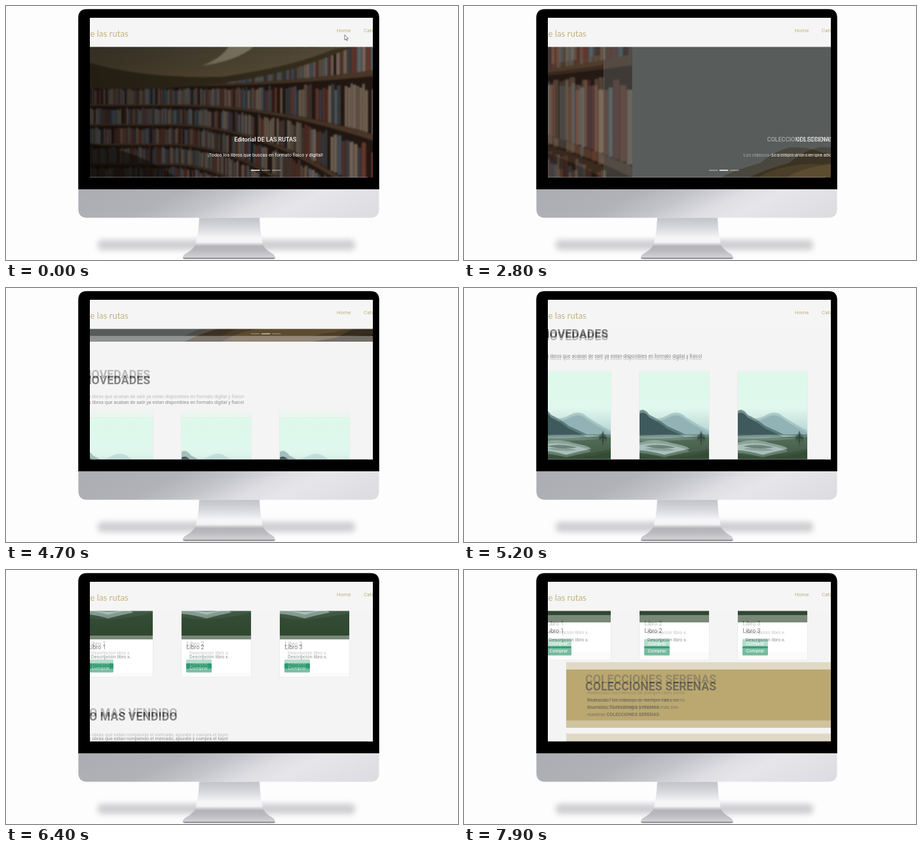
An HTML page that plays this animation: 690 px wide and 388 px high, repeating every 8 s.

```html
<!DOCTYPE html>
<html lang="es">
<head>
<meta charset="utf-8">
<title>Librería en pantalla</title>
<style>
  html, body { margin: 0; width: 100%; height: 100%; overflow: hidden; background: #fdfdfd; }
  svg { display: block; width: 690px; height: 388px; font-family: Roboto, sans-serif; }
  .h2 { font-size: 17.8px; font-weight: 700; fill: #4a4a4a; }
  .p { font-size: 7.17px; fill: #555; }
  .cap { font-size: 9px; font-weight: 500; fill: #fff; text-anchor: middle; }
  .sub { font-size: 7.2px; fill: #fff; text-anchor: middle; }
  .card { font-size: 8.8px; fill: #333; }
  .btn { font-size: 7.2px; fill: #fff; text-anchor: middle; }
  .nav { font-size: 8px; fill: #c0ae78; }
  .logo { font: 13.2px Lato, sans-serif; fill: #c4b27c; }
</style>
</head>
<body>
<svg viewBox="0 0 690 388">
  <defs>
    <clipPath id="view"><rect x="128" y="18" width="432" height="244"/></clipPath>
    <linearGradient id="chin" gradientUnits="userSpaceOnUse" x1="111" y1="279" x2="220" y2="498">
      <stop offset="0" stop-color="#acadb2"/><stop offset=".3" stop-color="#b1b2b7"/>
      <stop offset=".45" stop-color="#c3c4c9"/><stop offset=".6" stop-color="#dedee3"/>
      <stop offset=".7" stop-color="#e6e6ea"/><stop offset="1" stop-color="#dcdce0"/>
    </linearGradient>
    <linearGradient id="neck" x1="0" y1="0" x2="0" y2="1">
      <stop offset="0" stop-color="#c2c3c8"/><stop offset=".25" stop-color="#d8d9dd"/>
      <stop offset=".5" stop-color="#f6f6f8"/><stop offset=".6" stop-color="#f4f4f6"/>
      <stop offset=".7" stop-color="#b4b4b9"/><stop offset=".8" stop-color="#b8b8bd"/>
      <stop offset="1" stop-color="#d6d6da"/>
    </linearGradient>
    <linearGradient id="shade">
      <stop offset="0" stop-color="#000" stop-opacity=".55"/>
      <stop offset=".45" stop-color="#000" stop-opacity=".35"/>
      <stop offset="1" stop-color="#000" stop-opacity=".1"/>
    </linearGradient>
    <linearGradient id="roof" x1="0" y1="0" x2="0" y2="1">
      <stop offset="0" stop-color="#6b5f48"/><stop offset=".55" stop-color="#75674a"/>
      <stop offset="1" stop-color="#8a7648"/>
    </linearGradient>
    <linearGradient id="sky" x1="0" y1="0" x2="0" y2="1">
      <stop offset="0" stop-color="#dcf9ea"/><stop offset=".35" stop-color="#e0f8ee"/>
      <stop offset=".6" stop-color="#b4d2d2"/>
    </linearGradient>
    <linearGradient id="grass" x1="0" y1="0" x2="0" y2="1">
      <stop offset="0" stop-color="#56705c"/><stop offset="1" stop-color="#2f462f"/>
    </linearGradient>
    <filter id="blur" x="-10%" y="-100%" width="120%" height="300%"><feGaussianBlur stdDeviation="4"/></filter>
    <filter id="soft"><feGaussianBlur stdDeviation=".8"/></filter>
  </defs>
  <rect width="690" height="388" fill="#fdfdfd"/>
  <rect x="140" y="357" width="393" height="16" rx="6" fill="#cfcfd2" filter="url(#blur)"/>
  <path d="M110.500 279H569.500V310Q569.500 323.500 556 323.500H124Q110.500 323.500 110.500 310Z" fill="url(#chin)"/>
  <path d="M295 323.500H387Q388.500 350 391.500 362Q394 372 408 379Q412 383 410 385.500H271Q268 383 273 379Q287 372 290 362Q293.500 350 295 323.500Z" fill="url(#neck)"/>
  <path d="M270 384.500Q270 386.500 275 386.500H406Q411 386.500 411 384.500Z" fill="#85858b"/>
  <path d="M110.300 280V18Q110.300 4.800 124 4.800H556Q569.700 4.800 569.700 18V280Z" fill="#000"/>
  <g clip-path="url(#view)">
    <rect x="128" y="18" width="432" height="244" fill="#f4f4f4"/>
    <g id="pages"></g>
    <rect x="128" y="18" width="432" height="44.500" fill="#f5f5f5"/>
    <text class="logo" x="128.500" y="46.800">e las rutas</text>
    <text class="nav" x="505" y="39.600">Home</text>
    <text class="nav" x="546" y="39.600">Catálogo</text>
    <rect x="128" y="261.200" width="424" height=".8" fill="#aaa" opacity=".6"/>
  </g>
  <path id="arrow" d="M0 0V8L1.900 6.300L3.200 9L4.400 8.400L3.200 5.800H5.600Z" fill="#fff" stroke="#444" stroke-width=".7"/>
  <path id="hand" d="M-1 0Q0-1 1 0V4L4.500 5Q5.300 5.500 5 7L4 10H-1L-3.600 6Q-3.600 4.700-2.300 5.200L-1 6.400Z" fill="#fff" stroke="#333" stroke-width=".5"/>
</svg>
<script>
const $ = id => document.getElementById(id);
const clamp = x => Math.min(1, Math.max(0, x));
const smooth = x => (x = clamp(x), x * x * (3 - 2 * x));
const mix = (a, b, k) => a + (b - a) * k;
const LEFT = 96, WIDE = 600;

const text = (cls, x, y, str) => `<text class="${cls}" x="${x}" y="${y}">${str}</text>`;
const rect = (x, y, w, h, fill, more = '') =>
  `<rect x="${x}" y="${y}" width="${w}" height="${h}" fill="${fill}" ${more}/>`;
const path = (d, fill, more = '') => `<path d="${d}" fill="${fill}" ${more}/>`;

// Curved shelves: rows open up towards the right
const bend = x => Math.max(0, (x - 250) / 270) ** 2;
const shelf = (x, k) => 150 + 35 * bend(x) + k * (30 + 52 * bend(x));

function books() {
  let seed = 11;
  const rnd = () => (seed = seed * 16807 % 2147483647) / 2147483647;
  const tones = ['#6b3a30', '#75685a', '#4f6473', '#8d7a66', '#464a50', '#7d4438', '#57443a', '#6d7b80', '#927f70'];
  const parts = tones.map(() => '');
  let boards = '';
  for (let k = -2; k < 5; k++) {
    let top = '', low = '';
    for (let x = LEFT; x <= 700; x += 12) {
      top += `${x} ${shelf(x, k).toFixed(1)} `;
      low = `${x} ${(shelf(x, k) + 3 + 5 * bend(x)).toFixed(1)} ` + low;
    }
    boards += `M${top}L${low}Z`;
    for (let x = LEFT; x < 696;) {
      const b = bend(x), w = (2.3 + 2.6 * b) * (.7 + .7 * rnd());
      const y = shelf(x, k), h = (30 + 52 * b) * (.68 + .16 * rnd());
      if (rnd() > .06) parts[rnd() * tones.length | 0] +=
        `M${x.toFixed(1)} ${y.toFixed(1)}v${(-h).toFixed(1)}h${(w * .9).toFixed(1)}v${h.toFixed(1)}z`;
      x += w;
    }
  }
  return parts.map((d, i) => path(d, tones[i])).join('') + path(boards, '#5c4430');
}

const library = `<svg x="${LEFT}" y="62" width="${WIDE}" height="201" viewBox="${LEFT} 62 ${WIDE} 201">
  ${rect(LEFT, 62, WIDE, 201, '#2b1d16')}<g filter="url(#soft)">${books()}
  ${path('M96 62H530Q440 100 330 114T96 122Z', 'url(#roof)')}
  ${path('M96 76Q190 112 330 108Q440 92 500 66L530 62Q440 104 330 118T96 124Z', '#4a3c25')}
  ${path('M340 62H378Q352 84 300 91Q330 79 340 62Z', '#b5ab8c')}
  ${path('M96 206Q190 212 262 263H96Z', '#150f0b', 'opacity=".6"')}</g>
  ${rect(LEFT, 62, WIDE, 201, 'url(#shade)')}</svg>`;

const coast = rect(LEFT, 62, WIDE, 201, '#585c5b') +
  path('M272 263Q300 249 335 240Q356 222 380 216Q404 214 430 224L560 233L696 226V263Z', '#3d3324') +
  path('M330 263Q370 238 430 242Q480 234 530 244L490 263Z', '#645334', 'opacity=".8"') +
  path('M470 263Q520 250 696 246V263Z', '#2c2419');

const bars = [0, 1, 2].map(i => rect(374 + 16 * i, 250.2, 13.4, 1.5, '#fff', 'class="bar"')).join('');

const landscape = rect(0, 0, 106, 160, 'url(#sky)') +
  path('M0 72Q30 76 44 67Q58 59 70 70Q88 82 106 91V102H0Z', '#93b3b7') +
  path('M0 61Q7 56 15 67Q30 74 42 84Q58 91 72 98H0Z', '#3f5b5c') +
  rect(0, 97, 106, 63, 'url(#grass)') +
  path('M0 99Q45 96 92 99Q60 103 0 103Z', '#9db8b5') +
  path('M0 109Q25 103 49 110Q75 115 76 119Q56 123 38 128Q16 122 0 121Z', '#a9c0bb') +
  path('M8 115Q30 110 55 117Q30 120 8 115Z', '#4c6555') +
  path('M0 126Q40 136 106 119V160H0Z', '#30472f', 'opacity=".7"') +
  path('M88 103Q87 97 92 96L94 91L96 96Q101 97 100 104L95 103V110H93V103Z', '#33473f');

function card(i, top) {
  return `<g transform="translate(${118 + 150 * i} ${top})">` +
    rect(-.3, -.3, 106.6, 217.8, '#fff', 'stroke="#dfe5e2" stroke-width=".6"') + landscape +
    text('card', 7.5, 175.5, `Libro ${i + 1}`) + text('p', 12, 189, 'Descripción libro x.') +
    rect(7, 196.5, 39, 14, '#2f9a70', 'rx="1.5"') + text('btn', 26.5, 206, 'Comprar') + '</g>';
}

const section = (top, title, line) => text('h2', 118, top - 51, title) +
  text('p', 118, top - 21, line) + [0, 1, 2].map(i => card(i, top)).join('');

const band = rect(156, 946, 480, 89, '#bba972') + rect(156, 1055, 480, 89, '#bba972') +
  text('h2', 185, 978.3, 'COLECCIONES SERENAS') +
  text('p', 188, 995, 'Redescubrí los clásicos de siempre tales como') +
  text('p', 188, 1006, 'Brumalda, Torrevalnegra y muchos más con') +
  text('p', 188, 1017, 'nuestras <tspan font-weight="700">COLECCIONES SERENAS.</tspan>');

const page = rect(LEFT, 62, WIDE, 1200, '#f4f4f4') +
  `<g class="one">${library}` + text('cap', 396, 207.2, 'Editorial DE LAS RUTAS') +
  text('sub', 396, 230, '¡Todos los libros que buscas en formato físico y digital!') + '</g>' +
  `<g class="two">${coast}` + text('cap', 396, 207.2, 'COLECCIONES SERENAS') +
  text('sub', 396, 230, 'Los clásicos de siempre ahora en una edición especial') + '</g>' + bars +
  section(379, 'NOVEDADES', 'Los libros que acaban de salir ya estan disponibles en formato digital y fisico!') +
  section(714, 'LO MAS VENDIDO', 'Las obras que estan rompiendo el mercado, apurate y compra el tuyo!') + band;

$('pages').innerHTML = `<g>${page}</g><g>${page}</g>`;
const [main, ghost] = $('pages').children;

function place(layer, scroll, p) {
  layer.setAttribute('transform', `translate(0 ${-scroll})`);
  layer.querySelector('.one').setAttribute('transform', `translate(${-WIDE * p} 0)`);
  layer.querySelector('.two').setAttribute('transform', `translate(${WIDE * (1 - p)} 0)`);
  layer.querySelectorAll('.bar').forEach((bar, i) =>
    bar.setAttribute('opacity', i === (p > 0 ? 1 : 0) ? 1 : .45));
}

// Scroll keys: time, offset, speed in px per ms
const keys = [[3850, 0, 0], [4700, 181, .22], [5700, 320, .205], [7200, 587, .275], [7900, 794, .28]];
function scrollAt(t) {
  if (t <= keys[0][0]) return 0;
  const i = Math.max(1, keys.findIndex(k => t <= k[0]));
  const [t0, a, va] = keys[i - 1], [t1, b, vb] = keys[i];
  const d = t1 - t0, u = Math.min(1, (t - t0) / d), v = 1 - u;
  return a * (1 + 2 * u) * v * v + va * d * u * v * v + b * u * u * (3 - 2 * u) - vb * d * u * u * v;
}
const slideAt = t => smooth((t - 2370) / 600);

function drawCursor(t) {
  const a = smooth((t - 50) / 850), b = smooth((t - 1150) / 850);
  const x = mix(mix(517, 440, a), 391, b), y = mix(mix(44, 150, a), 240, b);
  $('arrow').setAttribute('transform', `translate(${x} ${y})`);
  $('arrow').setAttribute('visibility', t < 2100 ? 'visible' : 'hidden');
  $('hand').setAttribute('transform', 'translate(391.500 249)');
  $('hand').setAttribute('visibility', t >= 2100 && t < 2400 ? 'visible' : 'hidden');
}

function draw(t) {
  const scroll = scrollAt(t), speed = (scroll - scrollAt(t - 2)) / 2;
  const side = Math.cos((t - 4700) / 1600 * 2 * Math.PI) < 0 ? -1 : 1;
  const p = slideAt(t), sliding = p > 0 && p < 1;
  place(main, scroll, p);
  place(ghost, scroll + side * speed * 40, slideAt(t - 34));
  ghost.setAttribute('opacity', sliding ? .5 : .36);
  ghost.setAttribute('display', sliding || scroll > 0 ? 'inline' : 'none');
  drawCursor(t);
}

// The picture advances ten times a second
const start = performance.now();
let last = -1;
function tick(now) {
  const step = Math.floor(Math.max(0, now - start) % 8000 / 100) * 100;
  if (step !== last) draw(last = step);
  requestAnimationFrame(tick);
}
draw(0);
requestAnimationFrame(tick);
</script>
</body>
</html>
```
